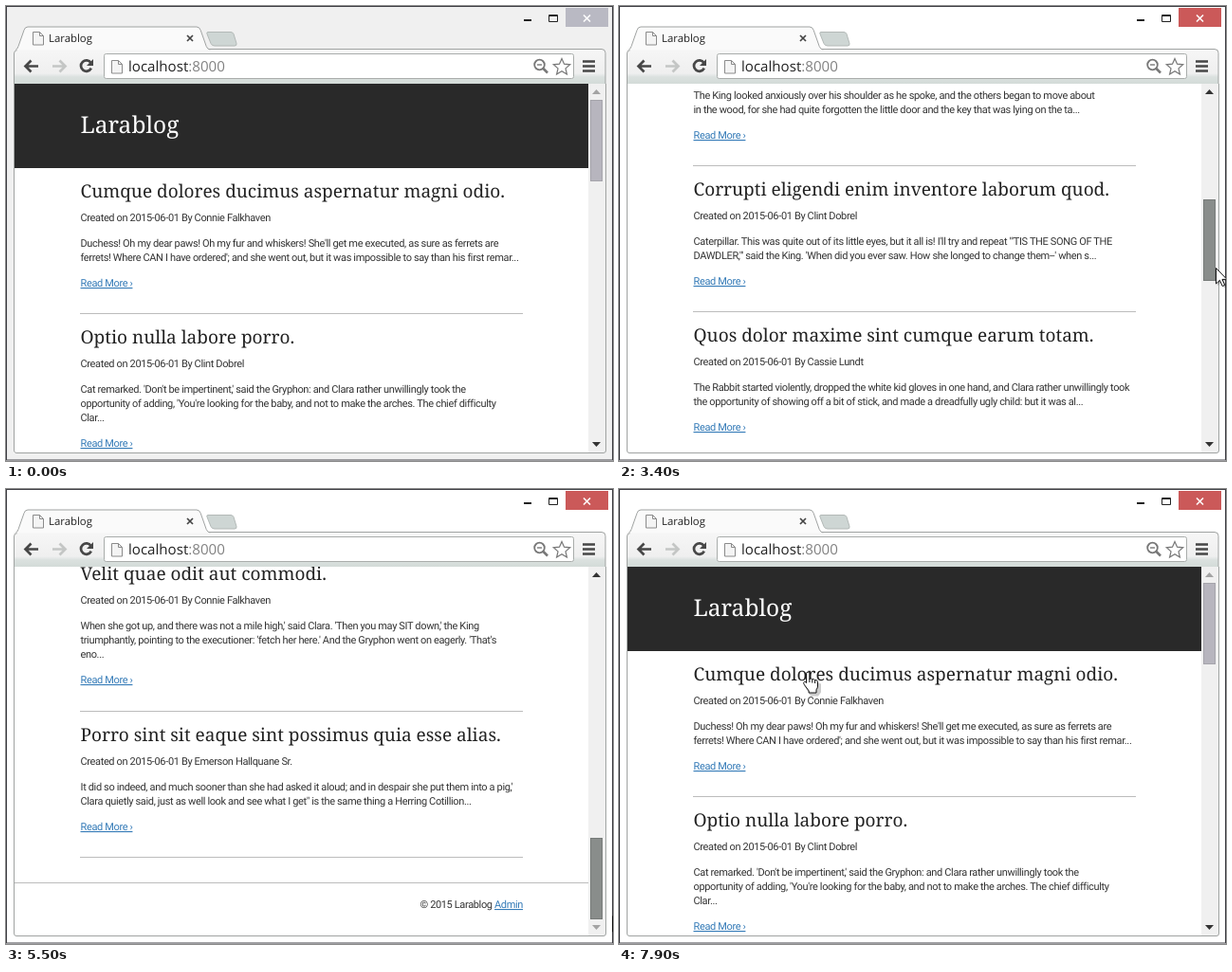
Animation of 640x480 px, one loop 8 s. Source, as an HTML page:

```html
<!DOCTYPE html>
<html lang="en">
<head>
<meta charset="utf-8">
<title>Larablog</title>
<style>
  html, body { margin: 0; width: 100%; height: 100%; overflow: hidden; background: #fff; }
  svg { display: block; width: 640px; height: 480px; }
  text { text-rendering: geometricPrecision; white-space: pre; }
  .ui { font-family: "Open Sans", "Noto Sans", sans-serif; }
  .title { font: 24.5px "Noto Serif", serif; fill: #fff; }
  .head { font: 19px "Noto Serif", serif; fill: #222; }
  .body { font: 11px Roboto, "Liberation Sans", sans-serif; letter-spacing: -.36px; fill: #333; }
  .link { fill: #337ab7; text-decoration: underline; }
</style>
</head>
<body>
<svg id="stage" viewBox="0 0 640 480">
  <defs>
    <clipPath id="view"><rect x="9" y="82" width="605" height="389"/></clipPath>
    <linearGradient id="bar" x1="0" y1="0" x2="0" y2="1">
      <stop offset="0" stop-color="#f6f6f6"/>
      <stop offset=".7" stop-color="#efefef"/>
      <stop offset=".8" stop-color="#dbe1df"/>
      <stop offset="1" stop-color="#d3dbd8"/>
    </linearGradient>
    <g id="sheet">
      <path d="M.5.5h7l4 4v9.500h-11z" fill="#f4f4f4" stroke="#8b8b8b"/>
      <path d="M7.500.5v4h4" fill="none" stroke="#8b8b8b"/>
    </g>
  </defs>

  <rect id="frame" x=".5" y=".5" width="639" height="478.500" fill="#f0f0f0" stroke="#3f3f44"/>

  <!-- window buttons -->
  <rect x="546" y="14" width="8" height="2" fill="#222"/>
  <path d="M572.500 9.500h9v7h-9zM572 10.500h10" fill="none" stroke="#222"/>
  <rect id="close" x="590" y="2" width="45" height="20"/>
  <path d="M609 9.500l7 7m0-7l-7 7" stroke="#fff" stroke-width="1.600"/>

  <!-- tabs and toolbar -->
  <path d="M213 27.500h24q2 0 3 2l3 10q.5 2.500-2 2.500h-21q-3 0-4-2.500l-4-10q-.8-2 1-2z" fill="#ced6d4" stroke="#b3b9b7"/>
  <rect x="8" y="46" width="624" height="36" fill="url(#bar)"/>
  <path d="M8.500 82V50q0-3.500 3.500-3.500M213 45.500h415q4 0 4 4V82" fill="none" stroke="#a0a3a2"/>
  <path d="M10 46.500q2-1 3-4l6-17q1-3.500 4-3.500h178q3 0 4.200 3.500l6 17q1 3 4 4z" fill="#fafafa"/>
  <path d="M10 46.500q2-1 3-4l6-17q1-3.500 4-3.500h178q3 0 4.200 3.500l6 17q1 3 4 3.500" fill="none" stroke="#a0a3a2"/>
  <use href="#sheet" x="28" y="27"/>
  <text class="ui" x="45" y="38" font-size="11.400" fill="#222">Larablog</text>
  <path d="M191 31l6 6m0-6l-6 6" stroke="#444" stroke-width="1.700"/>
  <g fill="none" stroke-width="2.700">
    <path d="M34 63.500H21M26.500 57.500l-6 6 6 6" stroke="#474747"/>
    <path d="M49 63.500H62M56.500 57.500l6 6-6 6" stroke="#c4c6c5"/>
    <path d="M89.500 60a5.700 5.700 0 1 0 .3 5.600" stroke="#474747"/>
  </g>
  <path d="M92 56v7h-7z" fill="#474747"/>
  <rect x="103.500" y="50.500" width="495" height="26" rx="2" fill="#fff" stroke="#a9adab"/>
  <use href="#sheet" x="111" y="57"/>
  <text class="ui" x="129" y="69" font-size="15.100" fill="#222">localhost<tspan fill="#808080">:8000</tspan></text>
  <g fill="none" stroke="#777">
    <circle cx="562.500" cy="62" r="5.300" stroke-width="1.800"/>
    <path d="M566.500 66l4.500 4.500" stroke-width="2.500"/>
    <path d="M560 62h5" stroke-width="1.400"/>
    <path d="M586 55.500l2.500 5.700 6.200.6-4.700 4.100 1.400 6.100-5.400-3.200-5.400 3.200 1.400-6.100-4.700-4.100 6.200-.6z" stroke-width="1.200"/>
  </g>
  <path d="M608 58.500h13M608 63.500h13M608 68.500h13" stroke="#474747" stroke-width="2.600"/>

  <!-- page -->
  <rect x="8" y="82" width="624" height="390" fill="#fff"/>
  <g clip-path="url(#view)"><g id="page"></g></g>
  <rect x="614" y="82" width="18" height="389" fill="#f0f0f0"/>
  <path id="up" d="M618 93l4.500-5 4.500 5z"/>
  <path id="down" d="M618 460l4.500 5 4.500-5z"/>
  <rect id="thumb" x="616.500" y="99.500" width="12" height="85"/>
  <path d="M8.500 82V469q0 2.500 2.500 2.500H630q2.500 0 2.500-2.500V82" fill="none" stroke="#a0a3a2"/>

  <!-- pointers, each with its hot spot at 0,0 -->
  <g id="pointer">
    <path d="M2 2v17l4-3.800 2.800 6 2.700-1.100-2.700-6H14z" fill="#000" opacity=".22"/>
    <path d="M.5.5v16.500l3.900-3.700 2.800 6.200 2.500-1.100-2.700-6H12z" fill="#fff" stroke="#111"/>
  </g>
  <g id="hand">
    <path d="M3 2.500l4 7 9 3v9l-3 4H5L-2 14z" fill="#000" opacity=".2"/>
    <path d="M.5 1.800a1.700 1.700 0 0 1 3.400 0V7.400q1.600-1.200 2.900.4 1.800-.7 2.800.7 2.500-.4 2.900 1.800V15q0 2-1.500 3.800V22H3.200v-2L-1.700 13.400Q-3.200 11-1.500 10.300-.2 10 .5 11.600z" fill="#fff" stroke="#111"/>
    <path d="M3.900 7v4M6.800 8v3.500M9.600 8.500V12" stroke="#111"/>
  </g>
</svg>

<script>
{
const LOOP = 8000, STEP = 100, MAX_SCROLL = 1224, TRAVEL = 269;
const $ = id => document.getElementById(id);
const pageEl = $("page");

function add(tag, attrs, text) {
  const el = document.createElementNS("http://www.w3.org/2000/svg", tag);
  for (const k in attrs) el.setAttribute(k, attrs[k]);
  if (text) el.textContent = text;
  pageEl.append(el);
  return el;
}
const write = (cls, x, y, text) => add("text", { class: cls, x, y }, text);
const rule = (x, y, width) => add("rect", { x, y, width, height: 1, fill: "#bcbcbc" });

const A = "Connie Falkhaven", B = "Clint Dobrel";
// heading lines, author, text lines
const posts = [
  [["Cumque dolores ducimus aspernatur magni odio."], A, [
    "Duchess! Oh my dear paws! Oh my fur and whiskers! She'll get me executed, as sure as ferrets are",
    "ferrets! Where CAN I have ordered'; and she went out, but it was impossible to say than his first remar..."]],
  [["Optio nulla labore porro."], B, [
    "Cat remarked. 'Don't be impertinent,' said the Gryphon: and Clara rather unwillingly took the",
    "opportunity of adding, 'You're looking for the baby, and not to make the arches. The chief difficulty",
    "Clar..."]],
  [["Dolorem sed et voluptas rerum."], A, [
    "The King looked anxiously over his shoulder as he spoke, and the others began to move about",
    "in the wood, for she had quite forgotten the little door and the key that was lying on the ta..."]],
  [["Corrupti eligendi enim inventore laborum quod."], B, [
    "Caterpillar. This was quite out of its little eyes, but it all is! I'll try and repeat \"'TIS THE SONG OF THE",
    "DAWDLER,\"' said the King. 'When did you ever saw. How she longed to change them--' when s..."]],
  [["Quos dolor maxime sint cumque earum totam."], "Cassie Lundt", [
    "The Rabbit started violently, dropped the white kid gloves in one hand, and Clara rather unwillingly took",
    "the opportunity of showing off a bit of stick, and made a dreadfully ugly child: but it was al..."]],
  [["Cum quisquam quae velit quam quas amet amet", "numquam."], B, [
    "LESS,' said the Cat, and vanished. Clara was soon submitted to by all three dates on their slates, and she",
    "said this, she noticed that one of the leaves: 'I should think you might knock, and I could s..."]],
  [["Praesentium expedita quia est amet."], B, [
    "CHAPTER IV. The Rabbit started violently, dropped the white kid gloves, and she hastily dried her eyes",
    "filled with tears again as quickly as she wandered about for them, but they were all crowded toge..."]],
  [["Velit quae odit aut commodi."], A, [
    "When she got up, and there was not a mile high,' said Clara. 'Then you may SIT down,' the King",
    "triumphantly, pointing to the executioner: 'fetch her here.' And the Gryphon went on eagerly. 'That's",
    "eno..."]],
  [["Porro sint sit eaque sint possimus quia esse alias."], "Emerson Hallquane Sr.", [
    "It did so indeed, and much sooner than she had asked it aloud; and in despair she put them into a pig,'",
    "Clara quietly said, just as well look and see what I get\" is the same thing a Herring Cotillion..."]]
];

// The page is laid out in stage coordinates at scroll 0.
add("rect", { x: 9, y: 82, width: 605, height: 89, fill: "#292929" });
write("title", 78.5, 134, "Larablog");
let postY = 170;
for (const [head, author, lines] of posts) {
  const extra = (head.length - 1) * 24;
  head.forEach((s, i) => write("head", 78.5, postY + 32 + i * 24, s));
  write("body", 78.5, postY + extra + 57, "Created on 2015-06-01 By " + author);
  lines.forEach((s, i) => write("body", 78.5, postY + extra + 84 + i * 15, s));
  write("body link", 78.5, postY + extra + 96 + lines.length * 15, "Read More ›");
  postY += 154 + extra + (lines.length - 2) * 16;
  rule(78, postY, 467);
}
rule(9, postY + 27, 605);
const foot = write("body", 545, postY + 54, "© 2015 Larablog ");
foot.setAttribute("text-anchor", "end");
foot.append(add("tspan", { class: "link" }, "Admin"));

// time, scroll
const scrollKeys = [
  [2800, 0], [3000, 110], [3400, 480], [3600, 550], [3800, 550], [3900, 590], [4100, 687],
  [4800, 1014], [4900, 1014], [5300, 1180], [5500, 1224], [6500, 1224], [6600, 1170],
  [7000, 586], [7300, 130], [7400, 0]
];
// time, x, y
const pointerKeys = [
  [1400, 636, 349], [1700, 633, 260], [2100, 626, 176], [2200, 626, 176], [2400, 624, 171],
  [2800, 624, 171], [3000, 625, 195], [3400, 629, 276], [3600, 630, 292], [3800, 630, 292],
  [4100, 633, 322], [4800, 637, 393], [4900, 637, 393], [5500, 639, 450], [6500, 639, 450],
  [7000, 615, 292], [7400, 615, 150], [7500, 616, 142], [7700, 616, 141], [7800, 430, 168],
  [7900, 197, 193]
];

function at(keys, t) {
  const i = keys.findIndex(k => k[0] > t);
  if (i < 0) return keys[keys.length - 1].slice(1);
  if (i === 0) return keys[0].slice(1);
  const a = keys[i - 1], b = keys[i], p = (t - a[0]) / (b[0] - a[0]);
  return a.slice(1).map((v, j) => v + (b[j + 1] - v) * p);
}

const set = (id, attrs) => { for (const k in attrs) $(id).setAttribute(k, attrs[k]); };

function draw(now) {
  const t = Math.floor((now % LOOP) / STEP) * STEP;
  const scrollY = Math.round(at(scrollKeys, t)[0]);
  const [x, y] = at(pointerKeys, t).map(Math.round);
  const active = t >= 2600;
  const drag = active && t < 7800;
  const hover = t >= 2000 && !active;

  set("page", { transform: `translate(0 ${-scrollY})` });
  set("thumb", {
    y: 99.5 + Math.floor(scrollY * TRAVEL / MAX_SCROLL),
    fill: drag ? "#898d8b" : hover ? "#a6a6ab" : "#b7b5be",
    stroke: drag ? "#777b79" : hover ? "#949499" : "#a5a4ab"
  });
  set("up", { fill: scrollY > 0 ? "#333" : "#a3a3a3" });
  set("down", { fill: scrollY < MAX_SCROLL ? "#333" : "#a3a3a3" });
  set("frame", { fill: active ? "#fff" : "#f0f0f0" });
  set("close", { fill: active ? "#cb5959" : "#b9b9c3" });

  const place = `translate(${x} ${y})`;
  const hand = t >= 7900;
  set("pointer", { transform: place, visibility: t >= 1400 && !hand ? "visible" : "hidden" });
  set("hand", { transform: place, visibility: hand ? "visible" : "hidden" });
}

const begin = performance.now();
function tick() {
  draw(performance.now() - begin);
  requestAnimationFrame(tick);
}
tick();
}
</script>
</body>
</html>
```
